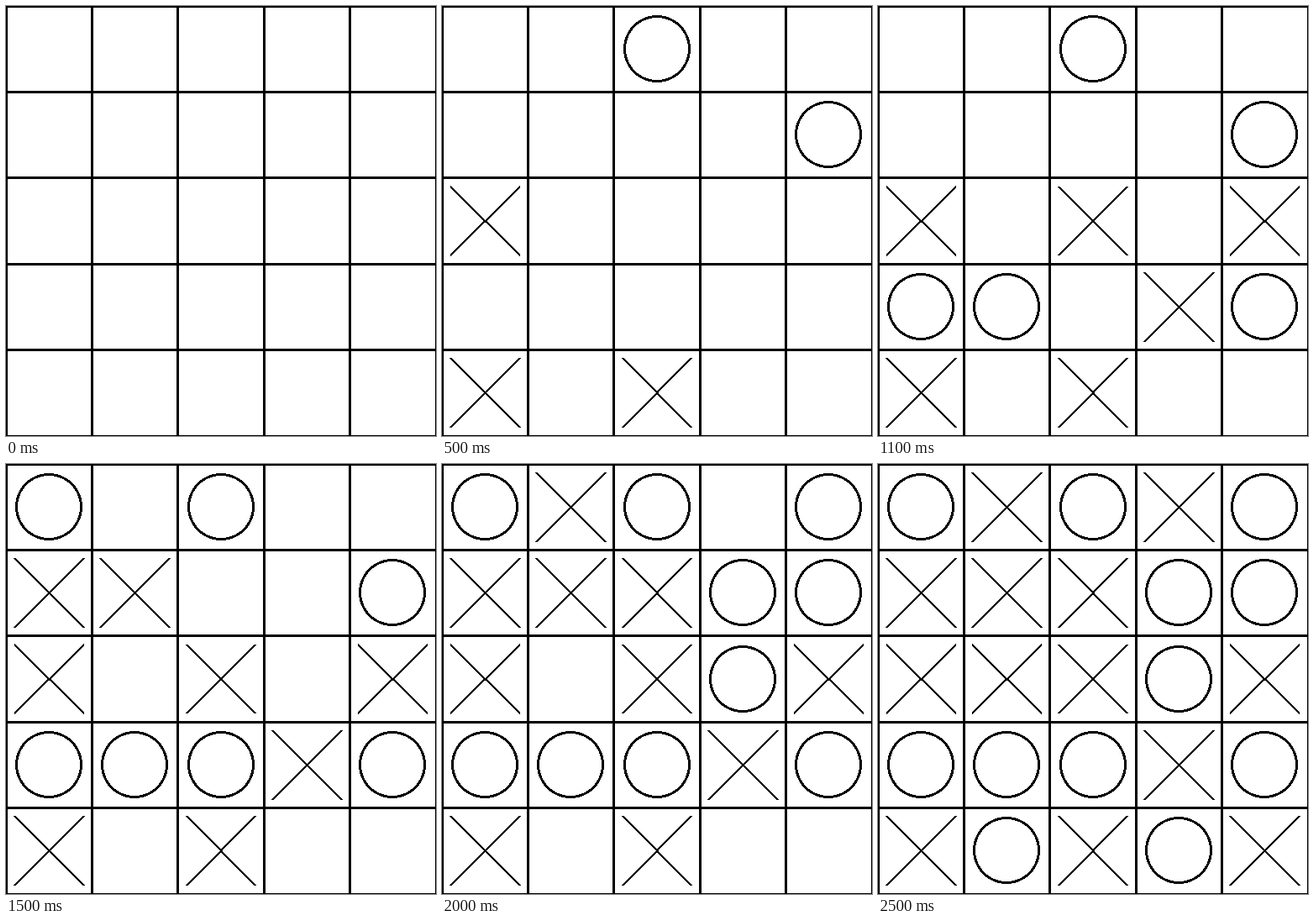
Write an HTML page with a canvas that moves like this. It is 512 px wide and 512 px high and loops after 2.6 s.

```html
<!DOCTYPE html>
<html lang="en">
<head>
<meta charset="utf-8">
<title>Five by five noughts and crosses</title>
<style>
html, body { margin: 0; height: 100%; overflow: hidden; background: #fff; }
canvas { display: block; width: 100vw; height: 100vh; image-rendering: pixelated; }
</style>
</head>
<body>
<canvas id="board" width="512" height="512"></canvas>
<script>
const ctx = document.getElementById('board').getContext('2d');
const SIZE = 512, CELL = SIZE / 5, STEP = 100, LOOP = 2600;

// Column and row of each move; crosses go first.
const moves = '04 20 24 41 02 03 22 13 42 43 33 00 01 23 11 40 21 32 10 31 44 34 30 14 12'
  .split(' ').map(s => [+s[0], +s[1]]);

function grid() {
  for (let i = 0; i <= 5; i++) {
    const p = Math.floor(i * CELL) - 1;
    ctx.fillRect(p, 0, 3, SIZE);
    ctx.fillRect(0, p, SIZE, 3);
  }
}

// Stepped line, three pixels thick across its longer axis.
function line(x0, y0, x1, y1) {
  const dx = x1 - x0, dy = y1 - y0;
  const wide = Math.abs(dx) > Math.abs(dy);
  const n = Math.max(Math.abs(dx), Math.abs(dy));
  for (let i = 0; i <= n; i++) {
    const x = Math.round(x0 + dx * i / n), y = Math.round(y0 + dy * i / n);
    if (wide) ctx.fillRect(x, y - 1, 1, 3);
    else ctx.fillRect(x - 1, y, 3, 1);
  }
}

function cross(col, row) {
  const near = k => Math.floor((k + 0.1) * CELL);
  const far = k => Math.floor((k + 0.9) * CELL);
  line(near(col), near(row), far(col), far(row));
  line(near(col), far(row), far(col), near(row));
}

function nought(col, row) {
  const mid = k => Math.floor((k + 0.5) * CELL);
  const r = 40;
  for (let y = -r; y < r; y++) {
    for (let x = -r; x < r; x++) {
      const d = Math.hypot(x + 0.5, y + 0.5);
      if (d <= r && d > r - 3) ctx.fillRect(mid(col) + x, mid(row) + y, 1, 1);
    }
  }
}

function draw(count) {
  ctx.fillStyle = '#fff';
  ctx.fillRect(0, 0, SIZE, SIZE);
  ctx.fillStyle = '#000';
  grid();
  moves.slice(0, count).forEach(([col, row], i) => (i % 2 ? nought : cross)(col, row));
}

let shown = -1;
function tick() {
  const count = Math.floor(performance.now() % LOOP / STEP);
  if (count !== shown) draw(shown = count);
  requestAnimationFrame(tick);
}
tick();
</script>
</body>
</html>
```
